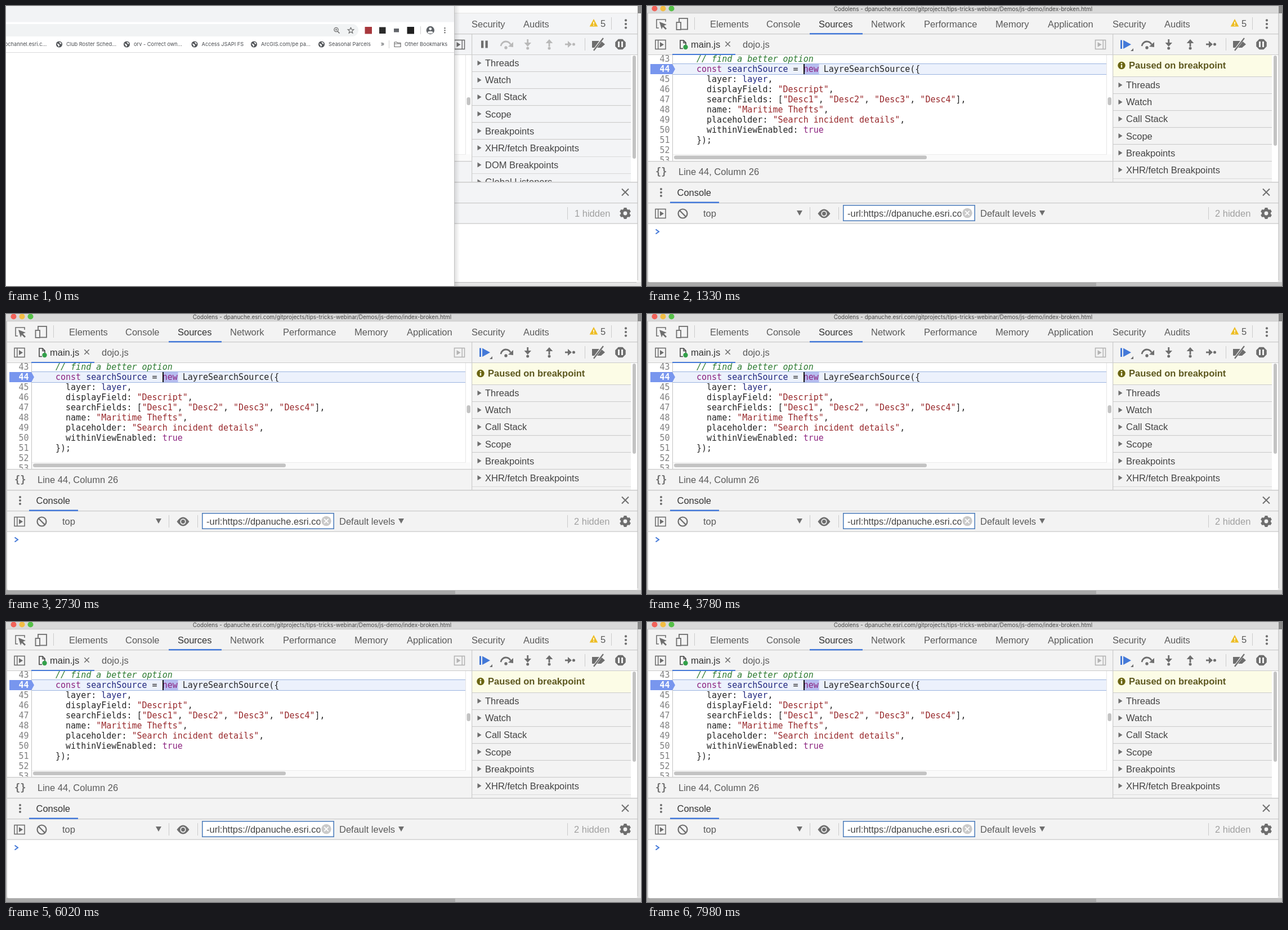
An HTML page with a canvas for the animation above (8000 ms loop, 1128 by 497 pixels).

```html
<!DOCTYPE html>
<html lang="en">
<head>
<meta charset="utf-8">
<title>Debugger</title>
<style>
html, body { margin: 0; width: 100%; height: 100%; overflow: hidden; background: #fff; }
canvas { display: block; }
</style>
</head>
<body>
<canvas id="stage" width="1128" height="497"></canvas>
<script>
const ctx = document.getElementById('stage').getContext('2d');
const LOOP = 8000, STEP = 70, PAUSE_AT = 1330, BLINK_FROM = 1290, BLINK = 530;
const UI = '16.5px "Liberation Sans", Arial, sans-serif';
const MONO = '15px "DejaVu Sans Mono", monospace';
const SMALL = '9.25px Inter, sans-serif';
const GREY = '#6e6e6e', LINE = '#cbcbcb', BLUE = '#4479d8', THUMB = '#c3c3c3';
const KEY = '#8c2480', STR = '#98292c', VAR = '#23297f', INK = '#262626';

function rect(x, y, w, h, color) {
  ctx.fillStyle = color;
  ctx.fillRect(x, y, w, h);
}
function pill(x, y, w, h, r, color) {
  ctx.fillStyle = color;
  ctx.beginPath();
  ctx.roundRect(x, y, w, h, r);
  ctx.fill();
}
function dot(x, y, r, color) {
  ctx.fillStyle = color;
  ctx.beginPath();
  ctx.arc(x, y, r, 0, 7);
  ctx.fill();
}
function ring(x, y, r, color, width) {
  ctx.strokeStyle = color;
  ctx.lineWidth = width;
  ctx.beginPath();
  ctx.arc(x, y, r, 0, 7);
  ctx.stroke();
}
function trace(points) {
  ctx.beginPath();
  for (let i = 0; i < points.length; i += 2) ctx.lineTo(points[i], points[i + 1]);
}
function poly(color, ...points) {
  trace(points);
  ctx.fillStyle = color;
  ctx.fill();
}
function stroke(color, width, ...points) {
  trace(points);
  ctx.strokeStyle = color;
  ctx.lineWidth = width;
  ctx.stroke();
}
function text(s, x, y, color = '#5a5a5a', font = UI, align = 'left') {
  ctx.font = font;
  ctx.fillStyle = color;
  ctx.textAlign = align;
  ctx.fillText(s, x, y);
}
function clipped(x, y, w, h, draw) {
  ctx.save();
  ctx.beginPath();
  ctx.rect(x, y, w, h);
  ctx.clip();
  draw();
  ctx.restore();
}
function cross(x, y, r, color, width) {
  stroke(color, width, x - r, y - r, x + r, y + r);
  stroke(color, width, x + r, y - r, x - r, y + r);
}
function dots(x, y, gap, r) {
  for (const d of [-gap, 0, gap]) dot(x, y + d, r, GREY);
}
function starPoints(x, y, n, outer, inner, turn) {
  const pts = [];
  for (let i = 0; i < n * 2; i++) {
    const a = turn + i * Math.PI / n, r = i % 2 ? inner : outer;
    pts.push(x + r * Math.cos(a), y + r * Math.sin(a));
  }
  return pts;
}

function panelIcon(x, y, barX, arrowX, color) {
  ctx.strokeStyle = color;
  ctx.lineWidth = 1.6;
  ctx.strokeRect(x - 9, y - 8, 18, 16);
  rect(x + barX, y - 8, 1.5, 16, color);
  poly(color, x + arrowX, y - 4.5, x + arrowX + 7, y, x + arrowX, y + 4.5);
}
function gear(x, y) {
  for (let i = 0; i < 6; i++) {
    ctx.save();
    ctx.translate(x, y);
    ctx.rotate(i * Math.PI / 3);
    poly(GREY, -3.2, -6, -2.4, -10, 2.4, -10, 3.2, -6);
    ctx.restore();
  }
  ring(x, y, 5.7, GREY, 4.6);
}

function stepIcons(color) {
  ctx.strokeStyle = color;
  ctx.lineWidth = 2.8;
  ctx.beginPath();
  ctx.arc(888, 72, 9, Math.PI * 1.03, Math.PI * 1.86);
  ctx.stroke();
  poly(color, 901, 64, 901, 73, 892, 72);
  dot(888, 74, 2.7, color);

  rect(925.3, 59, 2.8, 7, color);
  poly(color, 920.5, 65, 933, 65, 926.7, 72);
  dot(926.7, 75, 2.5, color);

  rect(963.6, 64, 2.8, 8, color);
  poly(color, 958.7, 66, 971.3, 66, 965, 59);
  dot(965, 75, 2.5, color);

  rect(993, 66.6, 6, 2.8, color);
  poly(color, 998, 62, 998, 74, 1005, 68);
  dot(1008.5, 68, 2.5, color);
}

function debugToolbar(paused) {
  if (paused) {
    rect(841, 60.5, 3, 15.5, BLUE);
    poly(BLUE, 846, 60.5, 860, 68.2, 846, 76);
    poly(GREY, 864, 75, 864, 80, 859, 80);
  } else {
    rect(844, 61.5, 4.3, 13, GREY);
    rect(851.5, 61.5, 4.3, 13, GREY);
  }
  stepIcons(paused ? GREY : '#b9b9b9');
  rect(1028, 57, 1, 22, LINE);
  poly(GREY, 1041, 62, 1057, 62, 1064, 68, 1057, 74, 1041, 74);
  stroke('#f3f3f3', 4, 1044, 79, 1060, 57);
  stroke(GREY, 2.2, 1044, 79, 1061, 57);
  poly(GREY, ...starPoints(1091.5, 68, 4, 10, 10, Math.PI / 8));
  rect(1087, 63, 3, 10, '#f3f3f3');
  rect(1093, 63, 3, 10, '#f3f3f3');
}

const SECTIONS = ['Threads', 'Watch', 'Call Stack', 'Scope', 'Breakpoints',
  'XHR/fetch Breakpoints', 'DOM Breakpoints', 'Global Listeners'];

function sidebar(paused, bar) {
  rect(828, 87, 294, 225, '#fff');
  const top = paused ? 126 : 87;
  clipped(828, 87, 283, 225, () => {
    if (paused) {
      rect(828, 87, 282, 38, '#fcfce6');
      rect(828, 125, 282, 1, LINE);
      dot(843, 105.5, 6.7, '#6a6410');
      rect(841.8, 104.5, 2.4, 5, '#fcfce6');
      rect(841.8, 101, 2.4, 2.2, '#fcfce6');
      text('Paused on breakpoint', 856, 111, '#5d5820', 'bold ' + UI);
    }
    SECTIONS.forEach((name, i) => {
      const y = top + i * 30.1;
      rect(828, y, 282, 29.5, bar);
      rect(828, Math.round(y + 29), 282, 1.4, LINE);
      poly(GREY, 837.5, y + 9.8, 844.5, y + 14.3, 837.5, y + 18.8);
      text(name, 851, y + 20.2, '#444');
    });
  });
  pill(1113, 88, 6, paused ? 160 : 183, 3, THUMB);
}

const TABS = { Elements: 112, Console: 212, Sources: 305, Network: 398, Performance: 492,
  Memory: 619, Application: 712, Security: 827, Audits: 919 };

function mainTabs() {
  stroke(GREY, 1.6, 21, 39, 17, 39, 17, 24, 33, 24, 33, 28);
  poly(GREY, 22, 28, 35, 33, 30, 35, 35, 40, 33, 42, 28, 37, 26, 41.5);
  ctx.strokeStyle = GREY;
  ctx.lineWidth = 1.8;
  ctx.strokeRect(57, 22, 15, 19.5);
  rect(51.5, 28, 9.5, 15, '#f3f3f3');
  ctx.strokeRect(52.5, 29, 7.5, 13);
  rect(84, 20, 1, 22, LINE);
  for (const [name, x] of Object.entries(TABS)) text(name, x, 37.8, name === 'Sources' ? '#333' : '#5a5a5a');
  rect(289, 48, 94, 2.5, BLUE);
  poly('#edbd25', 1044, 23, 1051.3, 36.5, 1036.7, 36.5);
  rect(1043.2, 28, 1.6, 4.2, '#fff');
  rect(1043.2, 33.4, 1.6, 1.6, '#fff');
  text('5', 1056, 36.8);
  rect(1075, 20, 1, 22, LINE);
  dots(1101, 32, 6.6, 2.1);
}

const CODE = [
  [['// find a better option', '#2c7a30']],
  [['const ', KEY], ['searchSource', VAR], [' = ', INK], ['new', KEY], [' LayreSearchSource({', INK]],
  [['  layer: ', INK], ['layer', VAR], [',', INK]],
  [['  displayField: ', INK], ['"Descript"', STR], [',', INK]],
  [['  searchFields: [', INK], ['"Desc1"', STR], [', ', INK], ['"Desc2"', STR], [', ', INK],
    ['"Desc3"', STR], [', ', INK], ['"Desc4"', STR], ['],', INK]],
  [['  name: ', INK], ['"Maritime Thefts"', STR], [',', INK]],
  [['  placeholder: ', INK], ['"Search incident details"', STR], [',', INK]],
  [['  withinViewEnabled: ', INK], ['true', KEY]],
  [['});', INK]], [], []
];

function codeLines() {
  rect(46, 103, 770, 18, '#ecf1fc');
  rect(46, 102, 770, 1, '#9ab3e0');
  rect(46, 121, 770, 1, '#9ab3e0');
  rect(278, 103, 27.5, 18, '#b7bdf0');
  poly('#7896ee', 6, 103, 45, 103, 50, 112, 45, 121, 6, 121);
  clipped(2, 87, 814, 187.5, () => {
    CODE.forEach((line, i) => {
      const y = 99 + i * 18;
      text(43 + i, 40.5, y, i === 1 ? '#fff' : '#808080', (i === 1 ? 'bold ' : '') + MONO, 'right');
      let x = 88;
      for (const [part, color] of line) {
        text(part, x, y, color, (i ? '' : 'italic ') + MONO);
        x += ctx.measureText(part).width;
      }
    });
  });
}

function editor(paused, caret) {
  rect(2, 87, 825, 188, '#fff');
  rect(45, 87, 1, 188, '#c4c4c4');
  rect(46, 263, 781, 12, '#fafafa');
  rect(816, 87, 1, 176, '#e6e6e6');
  rect(46, 263, 771, 1, '#ececec');
  if (paused) codeLines();
  if (caret) rect(278, 103, 2, 18, '#111');
  pill(48, 265.5, 449, 6.5, 3.2, THUMB);
  pill(818.5, 162, 6.5, 14, 3.2, THUMB);
}

function fileTabs(paused) {
  panelIcon(24, 68.5, -5, -1, GREY);
  stroke('#444', 1.6, 64, 75.5, 59, 75.5, 59, 61, 65, 61, 69, 65, 69, 70);
  stroke('#444', 1.4, 65, 61, 65, 65.5, 69, 65.5);
  dot(68.5, 73, 4.2, '#33a04a');
  text('main.js', 78, 74, '#333');
  cross(143.5, 67.5, 4.2, GREY, 1.6);
  text('dojo.js', 170, 74);
  rect(45, 85, 112, 2, BLUE);
  panelIcon(805.5, 68.5, 4, -5, paused ? '#b4b4b4' : GREY);
}

function drawer(hidden) {
  text('{}', 15, 299.5, GREY, 'bold 17px "DejaVu Sans Mono", monospace');
  text('Line 44, Column 26', 56, 300);
  dots(25, 331, 6, 2);
  text('Console', 53.5, 337, '#333');
  rect(41, 347.5, 87, 2.5, BLUE);
  cross(1100, 330.5, 6, GREY, 2);

  panelIcon(24, 368.5, -5, -1, GREY);
  ring(63.5, 368.5, 8, GREY, 2.2);
  stroke(GREY, 2.2, 58, 363, 69, 374);
  text('top', 100, 374);
  poly(GREY, 266, 363, 276, 363, 271, 372);
  rect(289, 357, 1, 22, LINE);
  ctx.fillStyle = GREY;
  ctx.beginPath();
  ctx.moveTo(303.5, 368.5);
  ctx.quadraticCurveTo(314.5, 352.5, 325.5, 368.5);
  ctx.quadraticCurveTo(314.5, 384.5, 303.5, 368.5);
  ctx.fill();
  ring(314.5, 368.5, 4.3, '#f3f3f3', 1.7);
  rect(340, 357, 1, 22, LINE);

  rect(348, 353, 235, 29, '#5381bd');
  rect(349.6, 354.6, 231.8, 25.8, '#fff');
  clipped(350, 354, 208.5, 27, () => text('-url:https://dpanuche.esri.com', 356, 374, '#444'));
  dot(569, 367.5, 8.7, '#cacaca');
  cross(569, 367.5, 3.8, '#fff', 1.8);
  text('Default levels', 592, 374);
  poly(GREY, 697, 363, 707, 363, 702, 372);
  rect(997, 357, 1, 22, LINE);
  text(hidden + ' hidden', hidden === 1 ? 1010 : 1009, 374, '#a0a0a0');
  gear(1100, 368);
  stroke(BLUE, 2, 15.5, 396.5, 21, 400.5, 15.5, 404.5);
}

function titleBar(paused) {
  rect(0, 0, 1122, 13, paused ? '#d9d9d9' : '#fcfcfc');
  rect(0, 12.5, 1122, 1, paused ? '#bdbdbd' : '#d8d8d8');
  if (!paused) return;
  ['#f2635a', '#f3bd43', '#56c148'].forEach((c, i) => dot(13.5 + i * 15, 4.5, 5, c));
  text('Codolens - dpanuche.esri.com/gitprojects/tips-tricks-webinar/Demos/js-demo/index-broken.html',
    561.5, 8.7, '#454545', '9.96px Inter, sans-serif', 'center');
}

function debuggerWindow(paused, caret) {
  const bar = paused ? '#f3f3f3' : '#f3f4f6';
  rect(0, 0, 1128, 497, paused ? '#e4e4e4' : '#f4f4f4');
  rect(1122, 0, 6, 13, '#898989');
  rect(0, 13, 2, 477, '#c4c4c4');
  rect(0, 490, 798, 7, paused ? '#a9a9a9' : '#e5e5e5');
  rect(798, 490, 330, 7, paused ? '#c4c4c4' : '#e5e5e5');
  pill(2, 2, 1120, 489, [0, 0, 5, 5], '#fff');
  titleBar(paused);
  rect(2, 13.5, 1120, 73, bar);
  rect(2, 276, 1120, 110, bar);
  for (const y of [49, 86, 312, 349, 385.5]) rect(2, y, 1120, 1.3, LINE);
  mainTabs();
  fileTabs(paused);
  debugToolbar(paused);
  editor(paused, caret);
  rect(2, 275, 825, 1.3, LINE);
  sidebar(paused, bar);
  rect(827, 50, 1.2, 262, LINE);
  rect(2, 312, 1120, 1.3, LINE);
  drawer(paused ? 2 : 1);
  rect(1121.5, 13, 1, 474, '#b9b9b9');
  rect(4, 490, 1116, 1, '#b9b9b9');
}

function globe(x, y) {
  dot(x, y, 5.6, '#55585c');
  poly('#fff', x - 4.5, y - 1.5, x - 1, y - .5, x + 1, y + 1.8, x - 1.3, y + 4.6, x - 2, y + 2);
  poly('#fff', x - .5, y - 4.2, x + 2.8, y - 3.2, x + 4.2, y - .3, x + 1.8, y - .8);
}

const BOOKMARKS = { 'Club Roster Sched...': 107, 'orv - Correct own...': 227, 'Access JSAPI FS': 347.5,
  'ArcGIS.com/pe pa...': 453, 'Seasonal Parcels': 573 };

function browserWindow() {
  const shade = ctx.createLinearGradient(796, 0, 806, 0);
  shade.addColorStop(0, 'rgba(0,0,0,.13)');
  shade.addColorStop(1, 'rgba(0,0,0,0)');
  rect(796, 0, 10, 497, shade);
  rect(0, 0, 796, 497, '#fff');
  rect(0, 0, 796, 28.5, '#f2f3f5');
  pill(-20, 32, 646, 22, 11, '#f1f3f4');
  rect(0, 82, 796, 1, '#d9dadb');

  ring(586.5, 42, 3.6, GREY, 1.3);
  stroke(GREY, 1.6, 589, 45, 592.5, 48.5);
  rect(584.7, 41.5, 3.6, 1, GREY);
  rect(586, 40.2, 1, 3.6, GREY);
  const star = starPoints(612.5, 43.5, 5, 5.6, 2.4, -Math.PI / 2);
  stroke(GREY, 1.2, ...star, star[0], star[1]);

  rect(637.5, 37, 12.5, 12.5, '#a8383d');
  rect(663, 37.5, 11.5, 11.5, '#2b2b2b');
  rect(689, 40, 9, 6.5, '#62656a');
  rect(712.5, 37, 12.5, 12.5, '#202020');
  rect(736, 36, 1, 14, '#d0d0d0');
  dot(753.8, 43, 7.2, '#5f6368');
  dot(753.8, 40.6, 2.4, '#fff');
  ctx.fillStyle = '#fff';
  ctx.beginPath();
  ctx.ellipse(753.8, 46.7, 4.6, 2, 0, 0, 7);
  ctx.fill();
  dots(779.5, 43.2, 4, 1.2);

  const ink = '#4a4d51';
  text('ochannel.esri.c...', 72.5, 71.3, ink, SMALL, 'right');
  for (const [name, x] of Object.entries(BOOKMARKS)) {
    globe(x - 12.5, 68);
    text(name, x, 71.3, ink, SMALL);
  }
  text('»', 665.5, 71.3, ink, '11.5px Inter, sans-serif');
  rect(680, 61, 1, 14, '#d0d0d0');
  stroke(GREY, 1.2, 690, 64, 694, 64, 695.5, 65.5, 701, 65.5, 701, 72.5, 690, 72.5, 690, 64);
  stroke(GREY, 1, 690, 67, 701, 67);
  text('Other Bookmarks', 708, 71.3, ink, SMALL);
  rect(796, 0, 1, 497, '#c3c3c3');
}

function frame(now) {
  const t = Math.floor(now % LOOP / STEP) * STEP;
  const paused = t >= PAUSE_AT;
  const caret = paused && Math.floor((t - BLINK_FROM) / BLINK) % 2 === 0;
  debuggerWindow(paused, caret);
  if (!paused) browserWindow();
}

const start = performance.now();
function tick() {
  frame(performance.now() - start);
  requestAnimationFrame(tick);
}
tick();
</script>
</body>
</html>
```
